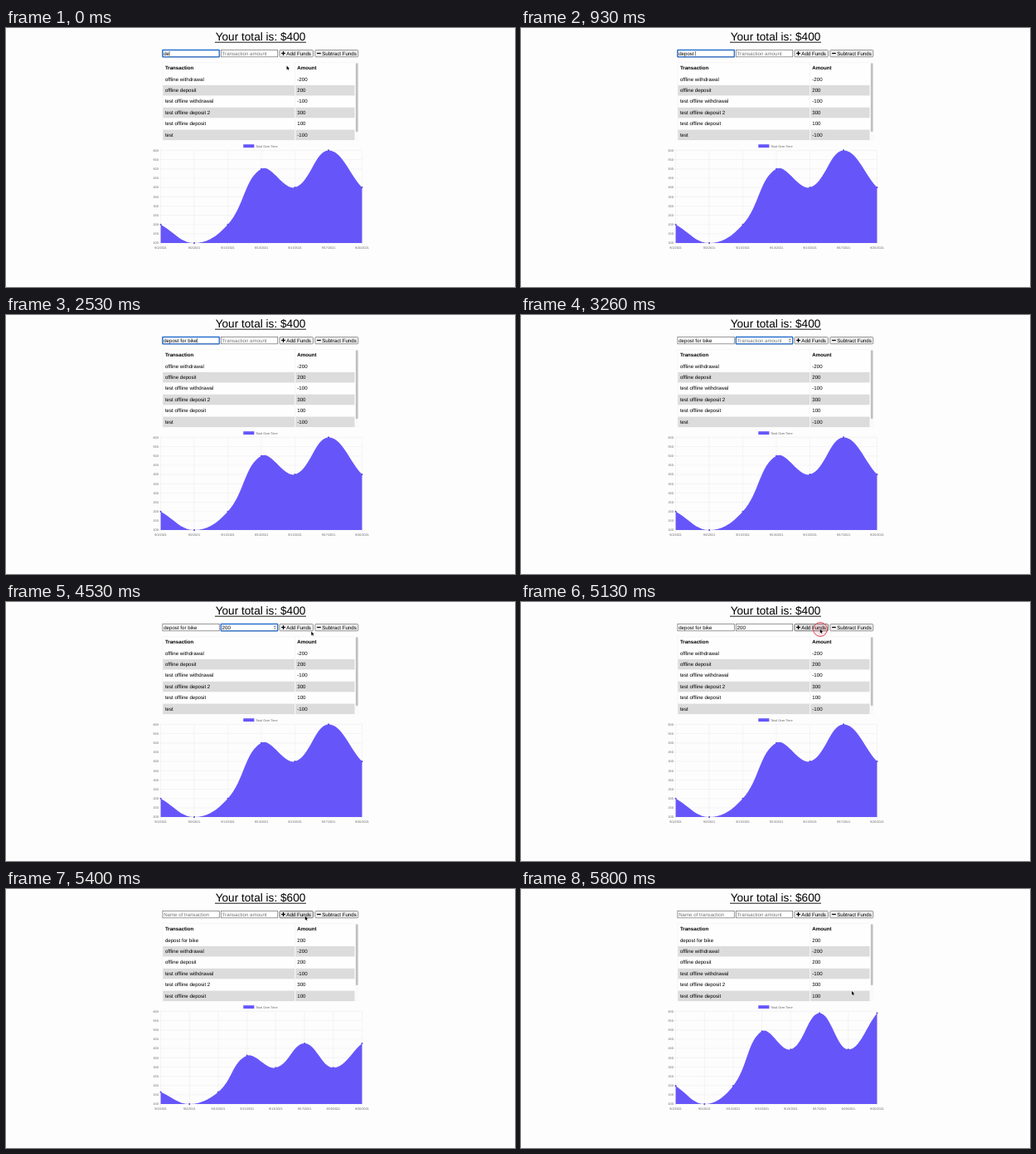
Write an HTML page that moves like this. It is 614 px wide and 312 px high and loops after 5.86 s.

```html
<!DOCTYPE html>
<html lang="en">
<head>
<meta charset="utf-8">
<title>Budget tracker</title>
<style>
  html, body { margin: 0; width: 100%; height: 100%; overflow: hidden; background: #fdfdfd; }
  svg { display: block; width: 614px; height: 312px; }
  text {
    font: 6.14px "Liberation Sans", Arial, sans-serif;
    white-space: pre;
    text-rendering: geometricPrecision;
  }
  .title { font-size: 13.65px; text-anchor: middle; }
  .head { font-weight: bold; }
  .hint { fill: #757575; }
  .tick { font-size: 3.77px; fill: #666; }
  .mid { text-anchor: middle; }
  .end { text-anchor: end; }
</style>
</head>
<body>
<svg id="stage" viewBox="0 0 614 312"></svg>
<script>
const LOOP = 5860, TICK = 1000 / 15;
const PURPLE = '#6656fa';
const stage = document.getElementById('stage');

function add(tag, attrs, parent = stage) {
  const el = document.createElementNS('http://www.w3.org/2000/svg', tag);
  for (const name in attrs) el.setAttribute(name, attrs[name]);
  return parent.appendChild(el);
}
function label(x, y, str, cls = '', parent = stage) {
  const el = add('text', { x, y, class: cls }, parent);
  el.textContent = str;
  return el;
}
const box = (x, y, width, height, attrs, parent) =>
  add('rect', { x, y, width, height, ...attrs }, parent);
const line = (x1, y1, x2, y2, stroke, w, parent) =>
  add('line', { x1, y1, x2, y2, stroke, 'stroke-width': w }, parent);
const show = (el, on) => { el.style.display = on ? '' : 'none'; };

// Title
const title = label(307, 15.2, '', 'title');
line(252, 17.2, 362, 17.2, '#000', 0.9);

// Form
function field(x, hint) {
  box(x, 26.6, 68.4, 8.2, { fill: '#fff', stroke: '#767676', 'stroke-width': 0.75 });
  const ring = box(x, 26.5, 68.4, 8.4, { fill: 'none', stroke: '#2a70cf', 'stroke-width': 1.3, rx: 0.6 });
  const text = label(x + 1.3, 32.8, '');
  const caret = line(0, 28, 0, 33.6, '#000', 0.5);
  return (value, focused, caretOn) => {
    text.textContent = value || hint;
    text.setAttribute('class', value ? '' : 'hint');
    show(ring, focused);
    show(caret, focused && caretOn);
    const end = x + 1.4 + (value ? text.getComputedTextLength() : 0);
    caret.setAttribute('x1', end);
    caret.setAttribute('x2', end);
  };
}
function button(x, w, str, plus) {
  const face = box(x, 26.6, w, 8.2, { fill: '#efefef', stroke: '#767676', 'stroke-width': 0.75, rx: 1 });
  line(x + 2.3, 30.5, x + 7, 30.5, '#000', 1.25);
  if (plus) line(x + 4.65, 28.1, x + 4.65, 32.9, '#000', 1.25);
  label(x + 8.4, 32.8, str);
  return face;
}
const nameField = field(188.9, 'Name of transaction');
const amountField = field(259.3, 'Transaction amount');
const spinner = add('g', {});
box(322.3, 27.4, 4, 6.6, { fill: '#efefef' }, spinner);
add('path', { d: 'M323.3 30l1-1.4 1 1.4zM323.3 31.4l1 1.4 1-1.4z', fill: '#505050' }, spinner);
const addButton = button(329.9, 40.6, 'Add Funds', true);
button(372.8, 52, 'Subtract Funds', false);

// Table
const ROW = 13.42;
box(188.8, 41.6, 236.4, 94.2, { fill: '#fff' });
for (let i = 0; i < 7; i++) {
  const fill = i && i % 2 === 0 ? '#dcdcdc' : '#fefefe';
  const y = 42 + i * ROW;
  box(189.2, y, 158.8, 12.6, { fill });
  box(349.2, y, 71.4, 12.6, { fill });
}
line(348.6, 41.8, 348.6, 135.5, '#f0f0f0', 0.8);
line(189, 41.7, 421, 41.7, '#ececec', 0.5);
line(189, 41.7, 189, 135.5, '#ececec', 0.5);
label(191.9, 50.2, 'Transaction', 'head');
label(351.3, 50.2, 'Amount', 'head');
const cells = Array.from({ length: 6 }, (_, i) => {
  const y = 50.2 + (i + 1) * ROW;
  return [label(191.9, y, ''), label(351.3, y, '')];
});
box(421.2, 41.6, 4, 94.2, { fill: '#fafafa' });
const thumb = box(421.9, 42.3, 2.7, 83, { fill: '#c1c1c1', rx: 1.35 });

const oldRows = [
  ['offline withdrawal', '-200'], ['offline deposit', '200'],
  ['test offline withdrawal', '-100'], ['test offline deposit 2', '300'],
  ['test offline deposit', '100'], ['test', '-100']
];
const newRows = [['depost for bike', '200'], ...oldRows];

// Chart
const LEFT = 186.6, RIGHT = 429.5, TOP = 147.4, BASE = 259.1;
box(286.3, 140.2, 13.1, 3.9, { fill: PURPLE });
label(301.2, 143.5, 'Total Over Time', 'tick');
for (let v = 100; v <= 600; v += 50) {
  const y = BASE - (v - 100) / 500 * (BASE - TOP);
  line(LEFT - 3.1, y, RIGHT, y, '#e5e5e5', 0.4);
  label(183.8, y + 1.35, v, 'tick end');
}
const chart = add('g', {});

function drawChart(values, dates, grow) {
  chart.replaceChildren();
  const step = (RIGHT - LEFT) / (values.length - 1);
  const pts = values.map((v, i) => [LEFT + i * step, BASE - (v - 100) / 500 * (BASE - TOP)]);
  const scale = y => BASE - (BASE - Math.min(BASE, Math.max(TOP, y))) * grow;
  // Smooth line with tension 0.4, control points kept inside the plot
  const handle = (i, side) => {
    const prev = pts[Math.max(0, i - 1)], p = pts[i], next = pts[Math.min(pts.length - 1, i + 1)];
    const a = Math.hypot(p[0] - prev[0], p[1] - prev[1]);
    const b = Math.hypot(next[0] - p[0], next[1] - p[1]);
    const f = 0.4 * (side < 0 ? -a : b) / (a + b);
    const x = p[0] + f * (next[0] - prev[0]);
    return [Math.min(RIGHT, Math.max(LEFT, x)), scale(p[1] + f * (next[1] - prev[1]))];
  };
  let curve = `M${LEFT} ${scale(pts[0][1])}`;
  for (let i = 1; i < pts.length; i++)
    curve += `C${handle(i - 1, 1)} ${handle(i, -1)} ${pts[i][0]} ${scale(pts[i][1])}`;

  pts.forEach(([x], i) => {
    line(x, TOP, x, BASE + 3.1, '#e5e5e5', 0.4, chart);
    label(x, 266.1, dates[i] + '/2021', 'tick mid', chart);
  });
  add('path', { d: `${curve}V${BASE}H${LEFT}Z`, fill: PURPLE }, chart);
  for (const [x, y] of pts)
    add('circle', { cx: x, cy: scale(y), r: 1.05, fill: '#5b4de0' }, chart);
}

// Pointer and click ring
const ring = add('circle', {
  cx: 361, cy: 33, r: 8.4, fill: '#e8455a', 'fill-opacity': 0.1, stroke: '#e0485a', 'stroke-width': 1
});
const pointer = add('path', {
  d: 'M0 0V4.6L1.1 3.6 1.8 5.2 2.6 4.8 1.9 3.3H3.3Z',
  fill: '#000', stroke: '#fff', 'stroke-width': 0.4, 'paint-order': 'stroke'
});

// Timeline in ms
const NAME = 'depost for bike', AMOUNT = '200';
const nameKeys = [60, 260, 460, 660, 860, 1060, 1260, 1530, 1730, 1930, 2060, 2130, 2260];
const amountKeys = [3330, 3530, 3730];
const FOCUS = 2730, PRESS = 5130, RESULT = 5200, CLEAR = 5330, GROW = 5167;
const path = [[4530, 368.3, 35.6], [5000, 360.8, 32.8], [5600, 360.8, 32.8], [5800, 399, 123]];

function pointerAt(t) {
  if (t < 60) return [338.6, 45.6];
  if (t < path[0][0]) return null;
  const i = path.findIndex(p => p[0] > t);
  if (i < 0) return path[path.length - 1].slice(1);
  const [ta, xa, ya] = path[i - 1], [tb, xb, yb] = path[i];
  const u = (t - ta) / (tb - ta), e = u * u * (3 - 2 * u);
  return [xa + (xb - xa) * e, ya + (yb - ya) * e];
}
const lastBefore = (keys, t, first) => keys.reduce((a, k) => k <= t ? k : a, first);
const blink = since => since % 1000 < 500;

// Screen updates come in an uneven two-out-of-three rhythm
function snap(t) {
  let k = Math.floor((t + 6.7) / TICK);
  if (k % 3 === 1) k--;
  return k * TICK;
}

let chartKey = '';
function render(t) {
  const done = t >= RESULT, cleared = t >= CLEAR;
  title.textContent = `Your total is: $${done ? 600 : 400}`;

  const typed = nameKeys.filter(k => k <= t).length;
  const digits = amountKeys.filter(k => k <= t).length;
  const onAmount = t >= FOCUS && t < PRESS;
  nameField(cleared ? '' : NAME.slice(0, 2 + typed), t < FOCUS, blink(t - lastBefore(nameKeys, t, 0)));
  amountField(cleared ? '' : AMOUNT.slice(0, digits), onAmount, blink(t - lastBefore(amountKeys, t, FOCUS)));
  show(spinner, onAmount);

  const hover = t >= 4600 && t < 5730;
  addButton.setAttribute('fill', hover ? '#e3e3e3' : '#efefef');
  addButton.setAttribute('stroke', hover ? '#4f4f4f' : '#767676');

  const rows = done ? newRows : oldRows;
  cells.forEach((pair, i) => pair.forEach((el, j) => { el.textContent = rows[i][j]; }));
  thumb.setAttribute('height', done ? 73.8 : 83);

  const st = snap(t);
  const key = done ? st : 'start';
  if (key !== chartKey) {
    chartKey = key;
    const values = [200, 100, 200, 500, 400, 600, 400];
    const dates = ['9/2', '9/2', '9/13', '9/13', '9/13', '9/17', '9/20'];
    if (done) {
      const u = Math.min(1, Math.max(0, (st - GROW) / 1000));
      drawChart([...values, 600], [...dates, '9/20'], 1 - (1 - u) ** 4);
    } else drawChart(values, dates, 1);
  }

  show(ring, t >= PRESS && t < CLEAR);
  const pos = pointerAt(t < PRESS ? t : st);
  show(pointer, pos);
  if (pos) pointer.setAttribute('transform', `translate(${pos})`);
}

const start = performance.now();
function loop() {
  render((performance.now() - start) % LOOP);
  requestAnimationFrame(loop);
}
loop();
</script>
</body>
</html>
```
